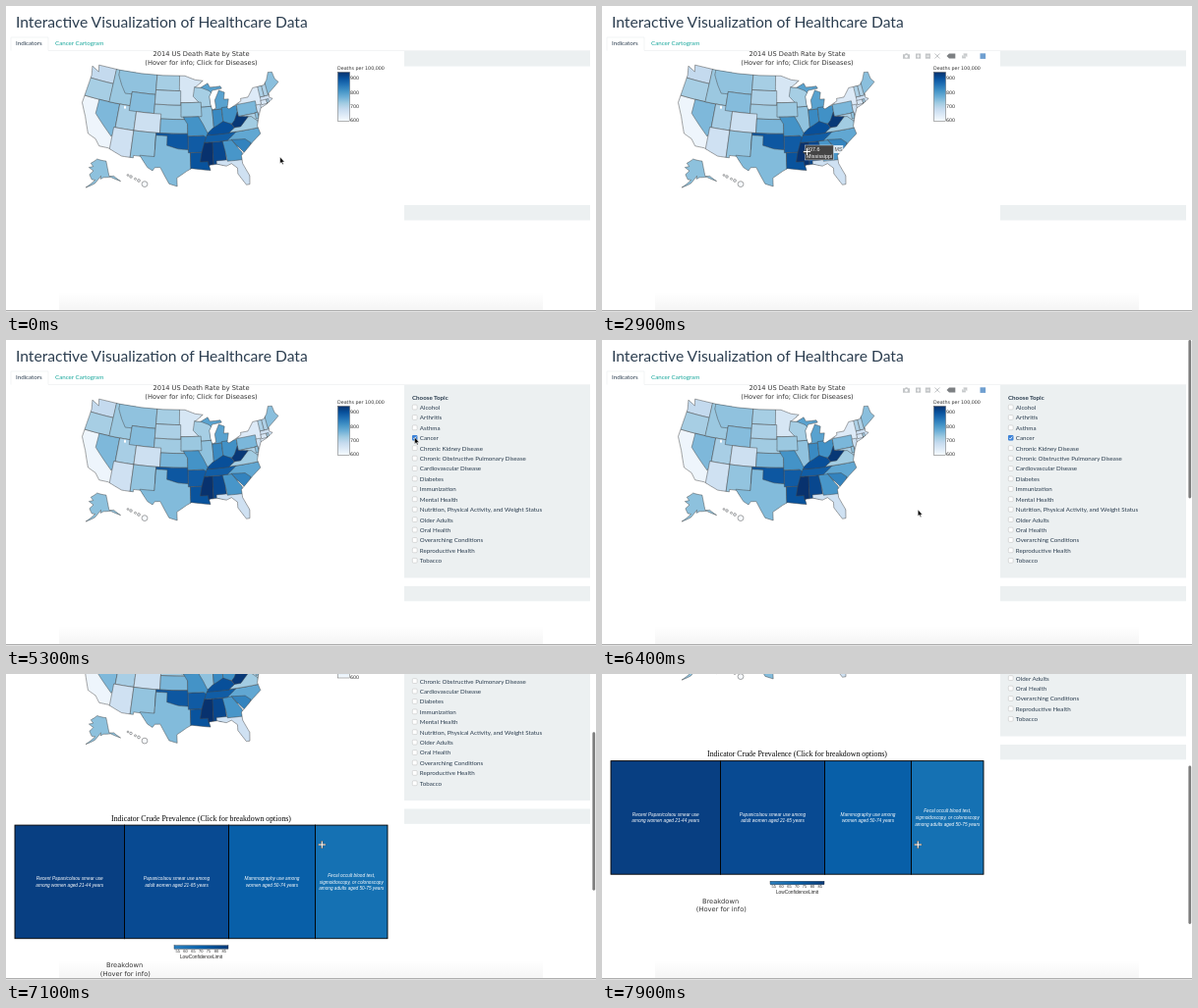
Recreate the animation shown at these times as an HTML page. Size 600 px wide and 312 px high, loop 8000 ms.

```html
<!DOCTYPE html>
<html lang="en">
<head>
<meta charset="utf-8">
<title>Healthcare dashboard</title>
<style>
html, body { margin: 0; width: 100%; height: 100%; overflow: hidden; background: #fff; }
svg { display: block; width: 600px; height: 312px; font-variant-ligatures: none; }
.ui { font: 6.19px Lato, sans-serif; fill: #2c3e50; }
.title { font-size: 15.63px; }
.bold { font-weight: 700; }
.plot { font: 6.68px "DejaVu Sans", sans-serif; fill: #333; text-anchor: middle; }
.tick { font: 4.8px "DejaVu Sans", sans-serif; fill: #333; }
.serif { font: 7.85px "Liberation Serif", serif; text-anchor: middle; }
.cell { font: italic 4.72px "Liberation Sans", sans-serif; fill: #fff; text-anchor: middle; }
.axis { font: 4.8px "Liberation Sans", sans-serif; fill: #222; text-anchor: middle; }
.tip { font: 5.4px "Liberation Sans", sans-serif; fill: #fff; }
.state, .coast { stroke: #444; stroke-width: .48; stroke-linejoin: round; }
.coast { fill: none; }
.well { fill: #ecf0f1; }
.box { fill: #fff; stroke: #bbb; stroke-width: .5; }
</style>
</head>
<body>
<svg id="stage" viewBox="0 0 600 312"></svg>
<script>
const LOOP = 8000, STEP = 100;
const BLUES = ['f7fbff', 'deebf7', 'c6dbef', '9ecae1', '6baed6', '4292c6', '2171b5', '08519c', '08306b'];
const TOPICS = ['Alcohol', 'Arthritis', 'Asthma', 'Cancer', 'Chronic Kidney Disease',
  'Chronic Obstructive Pulmonary Disease', 'Cardiovascular Disease', 'Diabetes', 'Immunization',
  'Mental Health', 'Nutrition, Physical Activity, and Weight Status', 'Older Adults', 'Oral Health',
  'Overarching Conditions', 'Reproductive Health', 'Tobacco'];
const NAMES = { MS: 'Mississippi', AL: 'Alabama', GA: 'Georgia', SC: 'South Carolina' };

// Places are "west longitude,latitude". The coast clips the states.
const COAST = {
  north: '124.7,48.4 122.3,47.6 122.8,49 95.2,49.2 92,48.3 89.6,48 92.1,46.7 90.4,46.6 88.2,47.4 87.6,46.5 84.4,46.5 84.1,46 87,45.8 88,44.6 87.9,43 87.5,41.7 86.4,42 86.5,43.7 85,45.7 83.4,45.1 83.9,43.7 82.5,43.6 83.2,41.8 82.7,41.5 79,42.8 79,43.3 76.8,43.3 74.9,45 71.5,45',
  east: '70.3,45.9 69.2,47.4 68,47.2 67.8,45.7 67,44.8 70.7,43.1 70.8,42.2 70,41.8 72,41 73.9,40.5 74.9,39 75.9,37 75.5,35.3 77.9,33.9 81.3,31.5 81.3,29.8 80.1,27 80.4,25.2 81.2,25.2 82.8,27.8 82.7,29 84,30.1 85.3,29.7 87.5,30.3 89.5,30.2 89.2,29.1',
  south: '93.8,29.7 95,29.1 97.3,27.7 97.2,25.9 99.1,26.4 101.4,29.8 102.7,29.7 103.2,29 104.5,29.6 106.5,31.8 108.2,31.8 108.2,31.3 111.1,31.3 114.8,32.5 117.1,32.5 118.4,33.8 120.6,34.5 122.5,37.8 124.4,40.4 124.1,46.5'
};
const ALASKA = '156.5,71.3 141,69.6 141,60.3 135.5,59.7 130,55.5 136,58.2 139.5,59.6 148,60 151.8,59.2 151,61 154,59.2 158,56.5 167,53.3 158,58.5 162,58.7 165.5,61.5 161,64 168,65.6 162,66.6 166.5,68.3';

// Death rate and two corners of a box, or an outline; later states cover earlier ones.
const STATES = {
  CA: [606, '125,42 114,32'],
  WA: [680, '125,49.5 117,45.9'],
  OR: [711, '125,45.9 117,42'],
  NV: [749, '120,42 114,42 114,36 114.6,35 120,39'],
  ID: [724, '117.1,49.5 111.05,42'],
  MT: [733, '116,49.5 104,49.5 104,45 111,45 111,44.5 113,44.4 114.5,46 116,48'],
  UT: [710, '114,42 109,37'],
  WY: [743, '111.05,45 104,41'],
  AZ: [661, '114.4,37 109,31'],
  NE: [718, '104,43 95.4,40'],
  CO: [665, '109,41 102,37'],
  NM: [731, '109,37 103,31'],
  KS: [752, '102,40 94.6,37'],
  OK: [888, '103,37 94.5,33.5'],
  TX: [745, '106.6,32 103,32 103,36.5 100,36.5 100,34.5 97,33.8 94,33.6 94,31 93.7,29 96,25 107,29'],
  MN: [648, '97.2,50 89,43.5'],
  ND: [712, '104,49.5 96.9,46'],
  SD: [706, '104,46 96.5,43'],
  MI: [784, '90.4,47.6 82,41.7'],
  IL: [733, '91.5,42.5 87.5,37'],
  WI: [712, '92.3,46.8 90.4,46.6 88,45.8 87,45 87,42.5 90.6,42.5 91.2,43.5 92.8,44.8'],
  IA: [724, '96.4,43.5 90.6,40.5'],
  IN: [820, '87.5,41.7 84.8,37.8'],
  OH: [810, '84.8,42 80.5,38.4'],
  AR: [883, '94.5,36.5 89.7,33'],
  MO: [807, '95.8,40.5 91.5,40.5 90.3,38.8 89.2,36.8 89.6,36 90.4,36.5 94.6,36.5 94.6,39'],
  LA: [894, '94,33 88.8,29'],
  AL: [909.1, '88.4,35 85.1,30'],
  MS: [937.6, '90.3,35 88.2,35 88.4,30 89.6,30 89.7,31 91.6,31 91.1,33'],
  FL: [662, '87.6,31 80,25'],
  NC: [776, '84.3,36.6 75,33.5'],
  SC: [829, '83.3,35.1 79.7,34.8 78.4,33.8 80,31.5'],
  GA: [801.9, '85.6,35 83.2,35 81,32.1 81,30.6 84.9,30.7 85.1,32.3'],
  TN: [880, '90.3,35 84.3,35 81.7,36.6 89.5,36.6'],
  NY: [636, '80,45.2 71.9,40.3'],
  PA: [751, '80.5,42.2 75,39.7'],
  NJ: [664, '75.1,41.3 73.8,38.9'],
  MD: [706, '79.5,39.7 75,38'],
  DE: [734, '75.8,39.8 75,38.5'],
  VA: [717, '83.7,36.6 75.5,36.6 75.5,38 77,39.2 78.3,39.3'],
  KY: [899, '89.4,36.5 83.7,36.5 82,37.5 82.6,38.3 84.8,39.1 88,37.8 89.2,37'],
  WV: [930, '82.6,38.3 81.7,39 80.6,40.6 80.5,39.7 77.8,39.3 80.3,37.5 82,37.5'],
  MA: [663, '73.4,42.75 69.5,41.3'],
  CT: [647, '73.5,42 71.8,41.1'],
  RI: [711, '71.8,42 71.2,41.2'],
  VT: [705, '73.4,45.1 72.1,42.75'],
  NH: [703, '72.2,45.2 70.8,42.75'],
  ME: [738, '71,48 66,43']
};

const rad = d => d * Math.PI / 180;

// Albers equal-area conic projection
function albers(p1, p2, lon0, lat0, k, tx, ty) {
  const s1 = Math.sin(rad(p1)), n = (s1 + Math.sin(rad(p2))) / 2, c = 1 - s1 * s1 + 2 * n * s1;
  const rho = lat => Math.sqrt(c - 2 * n * Math.sin(rad(lat))) / n;
  return ([west, lat]) => {
    const a = n * rad(lon0 - west), r = rho(lat);
    return [tx + k * r * Math.sin(a), ty - k * (rho(lat0) - r * Math.cos(a))];
  };
}
const mainland = albers(29.5, 45.5, 96, 38.7, 276.5, 179.4, 122);
const arctic = albers(55, 65, 154, 58.5, 96.8, 94.1, 177.6);

const mix = (a, b, u) => a.map((v, j) => v + (b[j] - v) * u);

// Projects an outline, bending every edge along its parallel.
function outline(places, proj = mainland) {
  let p = places.split(' ').map(s => s.split(',').map(Number));
  if (p.length === 2) p = [p[0], [p[1][0], p[0][1]], p[1], [p[0][0], p[1][1]]];
  const bent = p.flatMap((a, i) => [0, .25, .5, .75].map(u => proj(mix(a, p[(i + 1) % p.length], u))));
  return 'M' + bent.map(q => q.map(v => v.toFixed(2))).join('L') + 'Z';
}

function blue(rate) {
  const v = Math.min(7.999, Math.max(0, (rate - 590) / 350 * 8)), i = Math.floor(v);
  const rgb = hex => hex.match(/../g).map(s => parseInt(s, 16));
  return `rgb(${mix(rgb(BLUES[i]), rgb(BLUES[i + 1]), v - i).map(Math.round)})`;
}

const text = (cls, x, y, str, extra = '') => `<text class="${cls}" x="${x}" y="${y}" ${extra}>${str}</text>`;
const rect = (x, y, w, h, attrs = '') => `<rect x="${x}" y="${y}" width="${w}" height="${h}" ${attrs}/>`;
const shape = (d, fill, id = '') => `<path class="state" id="${id}" fill="${fill}" d="${d}"/>`;

const header = text('ui title', 10, 22.2, 'Interactive Visualization of Healthcare Data') +
  '<path d="M5 45.5V32H43V45.5H594" fill="none" stroke="#ecf0f1" stroke-width=".7"/>' +
  text('ui', 10, 39.6, 'Indicators') + text('ui', 50, 39.6, 'Cancer Cartogram', 'style="fill:#18a79c"');

const coast = outline(Object.values(COAST).join(' '));
const islands = [[124, 172.5, .9], [127, 174, 1.3], [131.5, 176.3, 1], [135, 178, 1.4], [141, 181.6, 2.9]];
const map = text('plot', 198.5, 51, '2014 US Death Rate by State') +
  text('plot', 198.5, 59.7, '(Hover for info; Click for Diseases)') +
  '<g clip-path="url(#country)">' +
  Object.entries(STATES).map(([code, [rate, places]]) => shape(outline(places), blue(rate), code)).join('') + '</g>' +
  `<path class="coast" id="coast" d="${coast}"/>` + shape(outline(ALASKA, arctic), blue(736)) +
  islands.map(([x, y, r]) => `<circle class="state" cx="${x}" cy="${y}" r="${r}" fill="${blue(588)}"/>`).join('') +
  '<ellipse cx="121" cy="103.3" rx="1" ry="1.8" fill="#fff"/>';

const colorbar = text('tick', 337, 64.6, 'Deaths per 100,000') +
  rect(337.5, 67.5, 12, 50, 'fill="url(#scale)" stroke="#444" stroke-width=".4"') +
  [900, 800, 700, 600].map((v, i) => text('tick', 350, 75.4 + 14.33 * i, v)).join('');

const modebar = `<g id="modebar" fill="#c3c6c8">
  <path d="M306 49.2h2l.8-1h1.6l.8 1h1.8v4.6h-7z"/><circle cx="309.5" cy="51.4" r="1.4" fill="#fff"/>
  ${rect(319, 48.5, 5.2, 5.2)}${rect(328.8, 48.5, 5.2, 5.2)}
  <path d="M320 51.1h3.2M321.6 49.5v3.2M329.8 51.1h3.2" stroke="#fff" stroke-width=".8"/>
  <path d="M338.5 48.5l5 5m0-5l-5 5" stroke="#c3c6c8"/>
  <path d="M350.5 51.1l2.5-2.5h6.3v5h-6.3z" fill="#7d8083"/>
  <path d="M367.5 48.3h4v3.4h-4zM366 50.2h4v3.4h-4z" stroke="#fff" stroke-width=".3"/>
  ${rect(384.5, 48.3, 5.6, 5.6, 'fill="#6f9fd0"')}</g>`;

const well = (y, h) => rect(405, y, 189, h, 'class="well"');
const closedPanel = `<g id="closed">${well(46, 15.5)}${well(203, 15.5)}</g>`;
const openPanel = `<g id="open">${well(46, 196.5)}${well(251, 15.3)}` +
  text('ui bold', 413, 60.5, 'Choose Topic') +
  TOPICS.map((name, i) => {
    const y = 68.6 + 10.42 * i;
    return rect(413.3, y - 2.5, 4.8, 4.8, 'rx="1" class="box"') + text('ui', 420.8, y + 2.3, name);
  }).join('') +
  `<g id="check">${rect(413, 97.1, 5.4, 5.4, 'rx="1" fill="#3b82d8"')}
  <path d="M414.2 99.9l1.1 1.2 1.9-2.6" fill="none" stroke="#fff" stroke-width=".8"/></g></g>`;

const CELLS = [
  [9, 120.5, '#083f82', 'Recent Papanicolaou smear use', 'among women aged 21-44 years'],
  [120.5, 226.5, '#084a92', 'Papanicolaou smear use among', 'adult women aged 21-65 years'],
  [226.5, 314.5, '#085fa8', 'Mammography use among', 'women aged 50-74 years'],
  [314.5, 388, '#1571b3', 'Fecal occult blood test,', 'sigmoidoscopy, or colonoscopy', 'among adults aged 50-75 years']
];
const treemap = '<g id="treemap">' +
  text('serif', 198.5, 263.2, 'Indicator Crude Prevalence (Click for breakdown options)') +
  CELLS.map(([x0, x1, fill, ...lines]) =>
    rect(x0, 267.6, x1 - x0, 115.6, `fill="${fill}" stroke="#000" stroke-width=".9"`) +
    lines.map((s, i) => text('cell', (x0 + x1) / 2, 327 + 6.8 * (i - (lines.length - 1) / 2), s)).join('')).join('') +
  rect(171, 390.3, 55, 3.4, 'fill="url(#limit)" stroke="#123" stroke-width=".4"') +
  [55, 60, 65, 70, 75, 80, 85].map((v, i) => text('axis', 174.7 + 7.85 * i, 397.4, v, 'style="font-size:4px"')).join('') +
  text('axis', 198.5, 403.4, 'LowConfidenceLimit') +
  text('plot', 120.5, 412.6, 'Breakdown') + text('plot', 121.3, 421, '(Hover for info)') + '</g>';

const stage = document.getElementById('stage');
stage.innerHTML = `<defs>
  <clipPath id="country"><path d="${coast}"/></clipPath>
  <linearGradient id="scale" x1="0" y1="1" x2="0" y2="0">${BLUES.map((c, i) => `<stop offset="${i / 8}" stop-color="#${c}"/>`).join('')}</linearGradient>
  <linearGradient id="limit"><stop stop-color="#2c7fbd"/><stop offset=".5" stop-color="#085fa8"/><stop offset="1" stop-color="#083a78"/></linearGradient>
  <linearGradient id="shade" x1="0" y1="0" x2="0" y2="1"><stop stop-opacity="0"/><stop offset="1" stop-opacity=".04"/></linearGradient>
  </defs>
  <g id="page">${header}${map}${colorbar}${modebar}${closedPanel}${openPanel}${treemap}<g id="tip"></g></g>
  ${rect(54, 292, 492, 18, 'fill="url(#shade)"')}
  ${rect(0, 310, 600, 1, 'fill="#adadad"')}${rect(0, 311, 600, 1, 'fill="#e2e2e2"')}
  ${rect(596.4, 0, 2.8, 161.5, 'id="thumb" rx="1.4" fill="#7c7c7c"')}
  <path id="arrow" d="M0 0V6.6L1.5 5.3 2.5 7.6 3.5 7.2 2.5 4.9H4.5Z" stroke="#fff" stroke-width=".4"/>
  <g id="cross"><path d="M-4 0H4M0-4V4" stroke="#555" stroke-width="2.2"/><path d="M-3.5 0H3.5M0-3.5V3.5" stroke="#fff"/></g>`;

const el = id => document.getElementById(id);
const show = (id, on) => el(id).setAttribute('visibility', on ? 'visible' : 'hidden');
const move = (id, x, y) => el(id).setAttribute('transform', `translate(${x} ${y})`);

const CURSOR = [[0, 278.7, 154], [700, 236, 151], [1800, 208.5, 148.5], [3400, 208.5, 148.5],
  [4000, 415.6, 99.3], [5500, 415.6, 99.3], [6200, 321.3, 173], [LOOP, 321.3, 173]];
const SCROLL = [[0, 0], [6400, 0], [6800, 76.7], [7100, 113.5], [7200, 117.5], [7400, 144], [7900, 179], [LOOP, 179]];

function track(keys, t) {
  const i = Math.max(1, keys.findIndex(k => k[0] >= t)), a = keys[i - 1], b = keys[i];
  return mix(a, b, (t - a[0]) / (b[0] - a[0])).slice(1);
}

function stateAt(x, y) {
  const p = stage.createSVGPoint();
  p.x = x;
  p.y = y;
  const inside = id => el(id).isPointInFill(p);
  return inside('coast') ? Object.keys(STATES).reverse().find(inside) : undefined;
}

let tipCode;
function drawTip(code) {
  if (code === tipCode) return;
  tipCode = code;
  const tip = el('tip');
  tip.innerHTML = '';
  if (!code) return;
  const b = el(code).getBBox(), cx = b.x + b.width / 2, cy = b.y + b.height / 2 - 1.5, x = cx + 2.4;
  const label = text('tip', x + 1.4, cy - 1.8, STATES[code][0].toFixed(1)) +
    text('tip', x + 1.4, cy + 5, NAMES[code] || code);
  tip.innerHTML = label;
  const w = Math.max(...[...tip.children].map(n => n.getComputedTextLength())) + 2.6;
  tip.innerHTML = rect(x, cy - 7.6, w, 15, 'fill="#444" stroke="#fff" stroke-width=".4"') +
    `<path d="M${cx} ${cy}l2.5-2v4z" fill="#444"/>` +
    rect(x + w + .3, cy - 7.6, 9.6, 8, 'fill="#fff" fill-opacity=".8"') +
    label + text('tip', x + w + 1.2, cy - 1.8, code, 'style="fill:#555"');
}

function draw(t) {
  const [x, y] = track(CURSOR, t), [scroll] = track(SCROLL, t);
  const inPlot = t > 0 && x < 400, open = t >= 3300, loaded = t >= 7100;
  const hit = inPlot ? stateAt(x, y + scroll) : undefined;
  const cross = loaded || Boolean(hit);
  move('page', 0, -scroll);
  show('modebar', inPlot);
  show('closed', !open);
  show('open', open);
  show('check', t >= 4500);
  show('treemap', loaded);
  show('thumb', t >= 6200);
  move('thumb', 0, scroll * .522);
  show('arrow', !cross);
  show('cross', cross);
  move('arrow', x, y);
  move('cross', x, y + (loaded ? 1 : 0));
  drawTip(hit);
}

function frame(now) {
  draw(Math.floor(now % LOOP / STEP) * STEP);
  requestAnimationFrame(frame);
}
requestAnimationFrame(frame);
</script>
</body>
</html>
```
